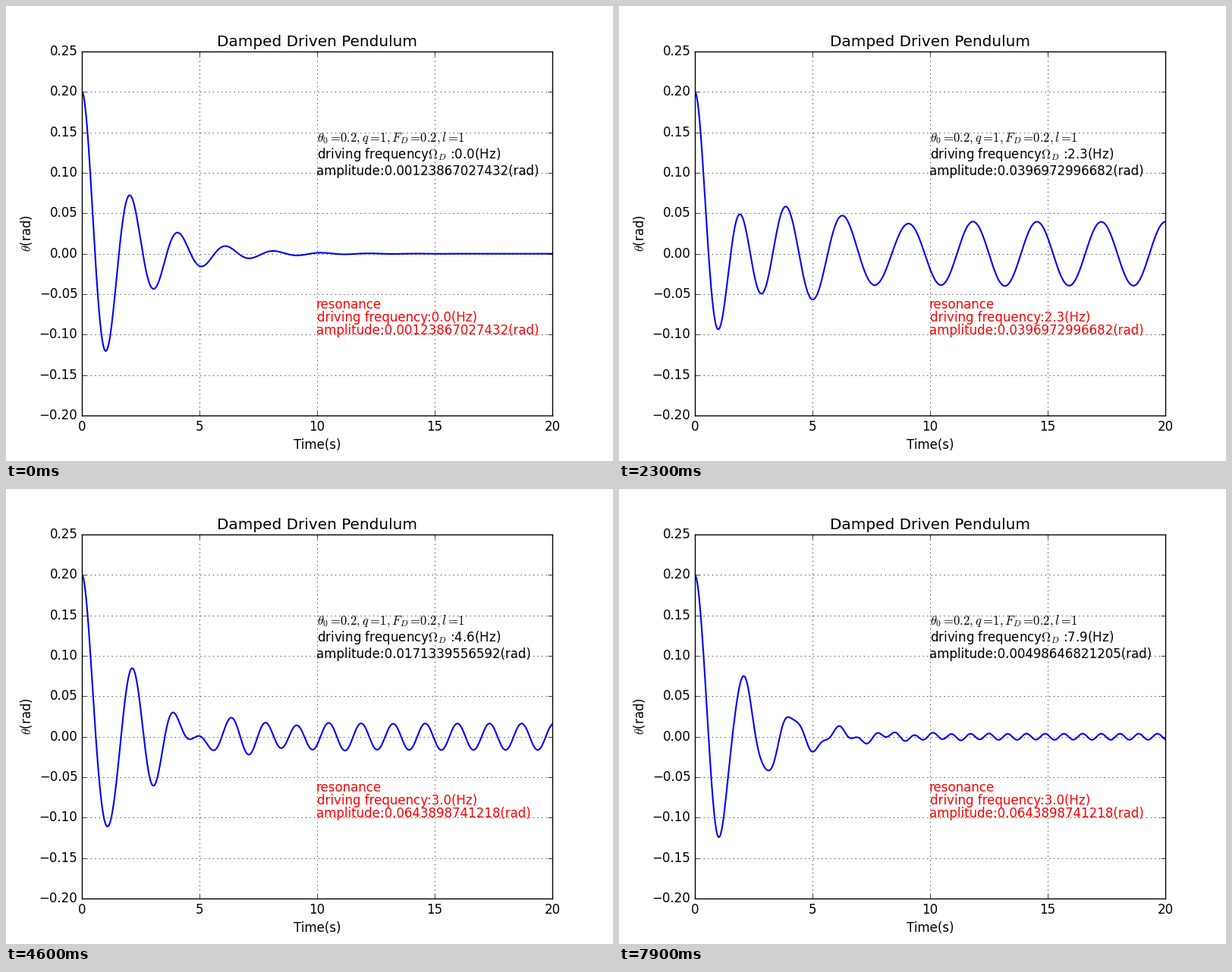
These frames come from a looping animation (800x600 px, 8 s). A matplotlib script:

```python
import numpy as np
import matplotlib.pyplot as plt
from matplotlib.animation import FuncAnimation

plt.style.use("classic")
plt.rcParams["font.family"] = "DejaVu Sans"

W, H, DPI = 800, 600, 100
FRAMES, INTERVAL = 80, 100
GRAVITY, LENGTH, DAMPING, FORCE, THETA0 = 9.8, 1.0, 1.0, 0.2, 0.2
DT, STEPS = 0.001, 20000


def simulate(freqs):
    """Euler-Cromer integration of all driving frequencies at once."""
    theta = np.empty((STEPS + 1, len(freqs)))
    theta[0] = THETA0
    omega = np.zeros(len(freqs))
    for i in range(STEPS):
        accel = (-GRAVITY / LENGTH * theta[i] - DAMPING * omega
                 + FORCE * np.sin(freqs * (i * DT)))
        omega = omega + accel * DT
        theta[i + 1] = theta[i] + omega * DT
    return theta


freqs = np.arange(FRAMES) / 10
theta = simulate(freqs)
time = np.arange(STEPS + 1) * DT
amps = theta[STEPS // 2:].max(axis=0)
best = [int(np.argmax(amps[:k + 1])) for k in range(FRAMES)]

fig = plt.figure(figsize=(W / DPI, H / DPI), dpi=DPI, facecolor="w")
ax = fig.add_axes([0.125, 0.1, 0.775, 0.8])
ax.set_title("Damped Driven Pendulum")
ax.set_xlabel("Time(s)")
ax.set_ylabel(r"$\theta$(rad)")
ax.set_xticks(range(0, 21, 5))
ax.set_yticks(np.arange(-4, 6) / 20)
ax.set_xlim(0, 20)
ax.set_ylim(-0.2, 0.25)
ax.grid(True)
curve, = ax.plot([], [], "b", lw=1.5)


def label(x, y, text="", color="k"):
    return fig.text(x / W, 1 - y / H, text, color=color, fontsize=12)


EQ = r"=\hspace{-0.2}"
label(410, 178, rf"$\theta_0{EQ}0.2,q{EQ}1,F_D{EQ}0.2,l{EQ}1$")
freq_now = label(410, 201)
amp_now = label(409, 223)
label(408.5, 399, "resonance", "r")
freq_best = label(410, 416, color="r")
amp_best = label(409, 433, color="r")


def update(k):
    b = best[k]
    curve.set_data(time[::10], theta[::10, k])
    freq_now.set_text(rf"driving frequency$\Omega_D$ :{freqs[k]:.1f}(Hz)")
    amp_now.set_text(f"amplitude:{amps[k]:.12g}(rad)")
    freq_best.set_text(f"driving frequency:{freqs[b]:.1f}(Hz)")
    amp_best.set_text(f"amplitude:{amps[b]:.12g}(rad)")
    return curve, freq_now, amp_now, freq_best, amp_best


anim = FuncAnimation(fig, update, frames=FRAMES, interval=INTERVAL,
                     repeat=True, repeat_delay=0, blit=False)
plt.show()
```
